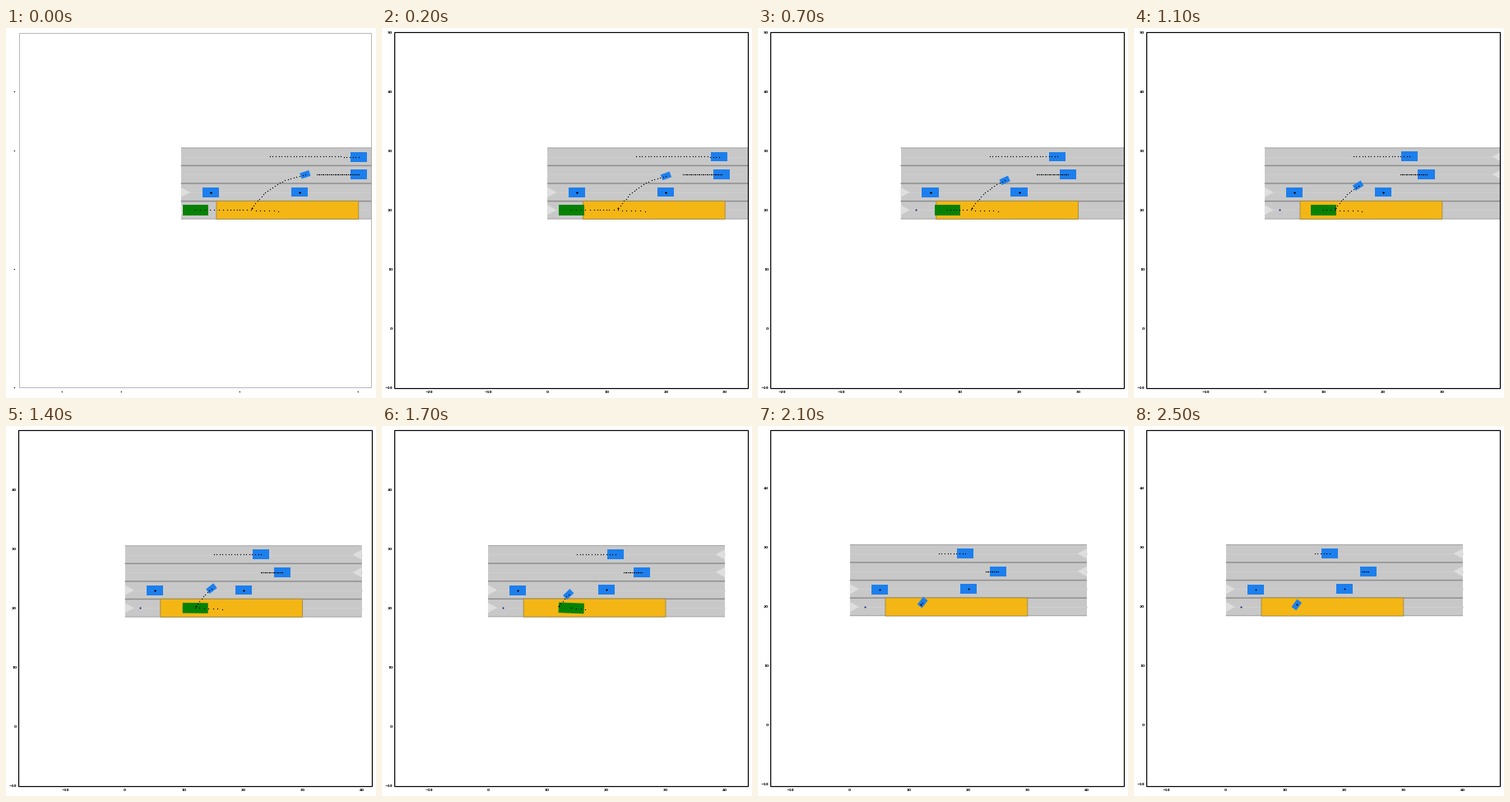
A matplotlib script that plays this animation: 450 by 450 pixels, repeating every 2.6 s.

```python
import numpy as np
import matplotlib.pyplot as plt
from matplotlib.animation import FuncAnimation
from matplotlib.patches import Polygon, Rectangle
from matplotlib.ticker import FuncFormatter, MultipleLocator

SIZE, DPI = 450, 100
FRAMES, INTERVAL = 26, 100
PX = 72 / DPI            # one pixel in points
SCALE = 7.2              # pixels per metre
LEFT, RIGHT, TOP, BOTTOM = 15.25, 445.25, 5.4, 437.4
ROAD_END, LANE = 40, 3
LANES = [20, 23, 26, 29]
BLUE = "#1c7fed"
CAR = (2.8, 1.64)

# Planned paths, one point per step
steps = np.arange(31)
ego_steps = np.arange(21)
ego_path = np.column_stack([
    np.interp(ego_steps, [0, 4, 7, 11, 12, 17, 20],
              [2.43, 5.64, 7.88, 9.92, 10.45, 14.07, 16.46]),
    np.interp(ego_steps, [0, 13, 17, 20], [20, 20, 19.96, 19.8]),
])
ego_angle = np.interp(ego_steps, [0, 13, 17, 20], [0, 0, -2.2, -4.5])

walk_knots = [0, 4, 7, 11, 17, 21, 22]
walk_time = np.minimum(steps, 22)
walk_x = np.polyfit(walk_knots, [21, 19.04, 17.6, 15.8, 13.58, 12.28, 11.95], 4)
walk_y = np.polyfit(walk_knots, [26.0, 25.5, 25.02, 24.12, 22.3, 20.73, 20.36], 4)
walker_path = np.column_stack([np.polyval(walk_x, walk_time),
                               np.polyval(walk_y, walk_time)])
walker_angle = np.interp(steps, [0, 7, 11, 17, 22], [18, 25, 32, 44, 54])

still = np.zeros(len(steps))
# path, angle per step, (length, width)
others = [
    (np.column_stack([30 - 0.5 * steps, 29 + steps / 400]), still, CAR),
    (np.column_stack([30 - 0.23 * steps - 0.05 * np.minimum(steps, 3),
                      still + 26]), still, CAR),
    (np.column_stack([still + 5, still + 22.96]), still, CAR),
    (np.column_stack([still + 20, still + 23.03]), still, CAR),
    (walker_path, walker_angle, (1.6, 1.0)),
]

fig = plt.figure(figsize=(SIZE / DPI, SIZE / DPI), dpi=DPI, facecolor="white")
ax = fig.add_axes([LEFT / SIZE, 1 - BOTTOM / SIZE,
                   (RIGHT - LEFT) / SIZE, (BOTTOM - TOP) / SIZE])
frame_box = Rectangle((0, 0), 1, 1, fill=False, transform=None, snap=False)
fig.add_artist(frame_box)


def draw_box(center, size, angle, color, z):
    length, width = size
    x, y = center
    ax.add_patch(Rectangle((x - length / 2, y - width / 2), length, width,
                           angle=angle, rotation_point="center",
                           facecolor=color, edgecolor="none", zorder=z))


def draw_trail(path):
    ax.plot(path[:, 0], path[:, 1], "o", color="black",
            markersize=1.3 * PX, markeredgewidth=0, zorder=8)


def draw_road():
    bottom = LANES[0] - LANE / 2
    ax.add_patch(Rectangle((0, bottom), ROAD_END, LANE * len(LANES),
                           facecolor="#c8c8c8", edgecolor="none", zorder=1))
    for i in range(len(LANES) + 1):
        outer = i in (0, len(LANES))
        ax.plot([0, ROAD_END], [bottom + i * LANE] * 2, zorder=3,
                color="#9c9c9c" if outer else "#8c8c8c", snap=False,
                lw=(0.9 if outer else 1.4) * PX, solid_capstyle="butt")
    for i, y in enumerate(LANES):
        ax.plot([0, ROAD_END], [y, y], color="#cecece", lw=PX, zorder=2)
        start, tip = (0, 1.55) if i < 2 else (ROAD_END, ROAD_END - 1.55)
        ax.add_patch(Polygon([(start, y - 0.85), (start, y + 0.85), (tip, y)],
                             facecolor="#dedede", edgecolor="none", zorder=2))


def draw_border(faint):
    inset = 1 if faint else 0
    frame_box.set_bounds(15.5 + inset, SIZE - 438.5 + inset,
                         430 - 2 * inset, 433 - 2 * inset)
    frame_box.set_edgecolor("#a8a8a8" if faint else "black")
    frame_box.set_linewidth((0.8 if faint else 1.2) * PX)


def style_axes(center, faint):
    half_w = (RIGHT - LEFT) / 2 / SCALE
    half_h = (BOTTOM - TOP) / 2 / SCALE
    ax.set_xlim(center[0] - half_w, center[0] + half_w)
    ax.set_ylim(center[1] - half_h, center[1] + half_h)
    ax.patch.set_visible(False)
    ax.spines[:].set_visible(False)

    def label(value, _):
        value = round(value)
        if faint:
            return "" if value in (0, 20, 50) else "• "
        return str(value).replace("-", "\u2212")

    for axis in (ax.xaxis, ax.yaxis):
        axis.set_major_locator(MultipleLocator(10))
        axis.set_major_formatter(FuncFormatter(label))
    ax.tick_params(length=0, labelsize=4.3 * PX)
    ax.tick_params(axis="x", pad=3.4 * PX)
    ax.tick_params(axis="y", pad=2.2 * PX)
    for text in ax.get_xticklabels() + ax.get_yticklabels():
        text.set_fontweight("bold")


def draw(frame):
    ax.clear()
    faint = frame == 0
    style_axes(ego_path[min(frame, len(ego_path) - 1)], faint)
    draw_border(faint)
    draw_road()
    ax.add_patch(Rectangle((6, 18.47), 24, 3.06, facecolor="#f4b614",
                           edgecolor="#a08a48", lw=0.9 * PX, zorder=4,
                           snap=False))
    ax.plot(2.5, 20, "o", color="#14148c", markersize=2 * PX,
            markeredgewidth=0, zorder=5)
    for path, angles, size in others:
        draw_box(path[frame], size, angles[frame], BLUE, 6)
        draw_trail(path[frame:])
    if frame < len(ego_path):
        draw_box(ego_path[frame], (4.3, 1.75), ego_angle[frame], "#058205", 7)
        draw_trail(ego_path[frame:])
    return []


animation = FuncAnimation(fig, draw, frames=FRAMES, interval=INTERVAL,
                          init_func=lambda: [], repeat=True, repeat_delay=0,
                          blit=False)
plt.show()
```
